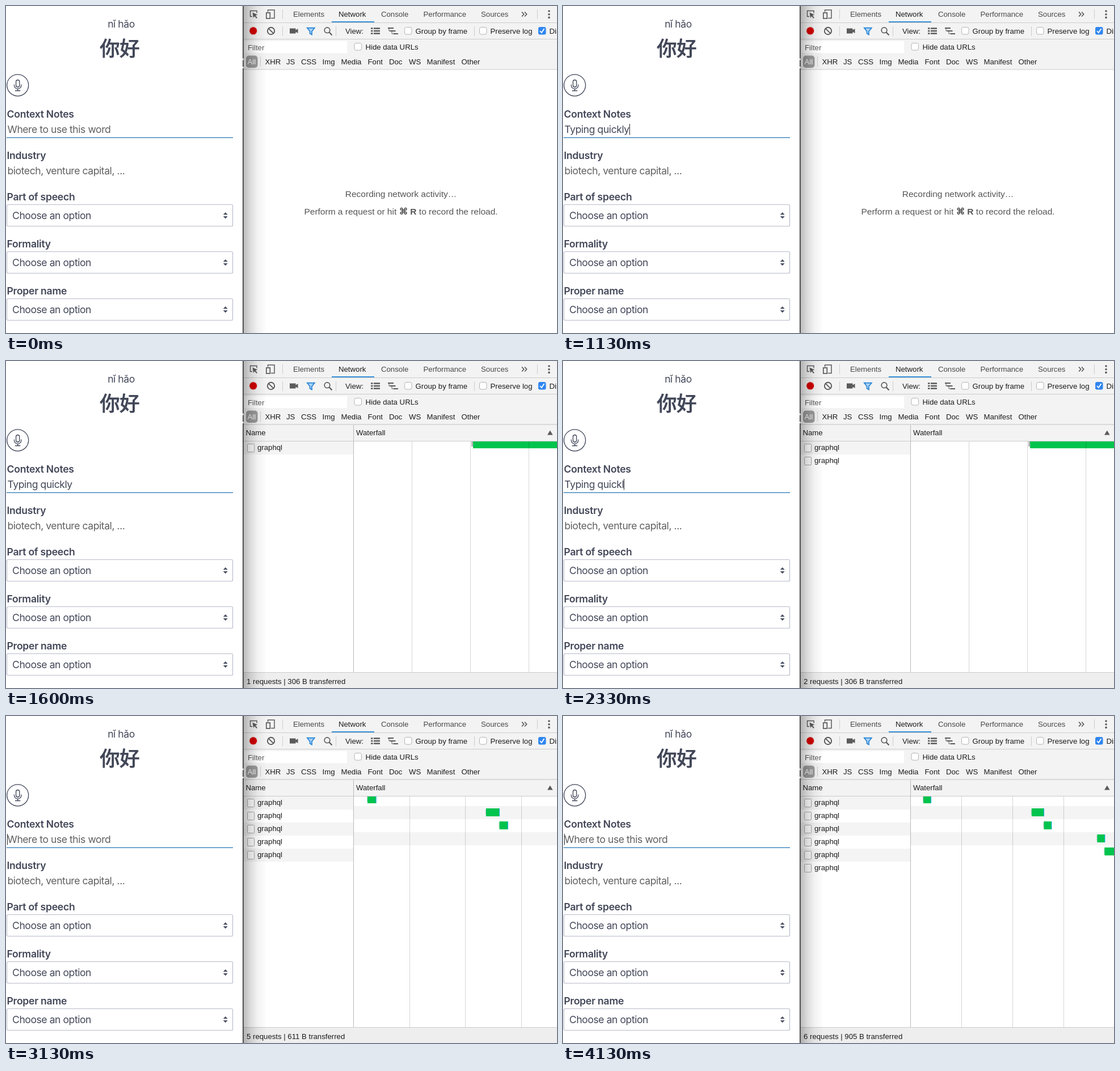
Recreate the animation shown at these times as an HTML page. Size 971x577 px, loop 4540 ms.

```html
<!DOCTYPE html>
<html lang="en">
<head>
<meta charset="utf-8">
<title>Throttled form requests</title>
<style>
  html, body { margin: 0; width: 100%; height: 100%; overflow: hidden; background: #fff; }
  svg { display: block; }
  text { white-space: pre; }
  .form { font: 17.6px Inter, "Open Sans", sans-serif; font-optical-sizing: none; letter-spacing: -.026em; fill: #424758; }
  .label { font-weight: 600; letter-spacing: -.015em; }
  .hint { fill: #606060; }
  .mid { text-anchor: middle; }
  .word { font: 35px "Noto Sans CJK SC", "Noto Sans CJK", sans-serif; letter-spacing: 0; stroke: #424758; stroke-width: 1.2; }
  .tools { font: 13.2px "Liberation Sans", Arial, sans-serif; fill: #1c1c1c; }
  .tabs { fill: #484848; }
  .big { font-size: 15.5px; fill: #555; }
  .line { fill: none; stroke: #ccc; }
  .icon { fill: none; stroke: #5a5a5a; stroke-width: 1.7; }
  .solid { fill: #5a5a5a; }
</style>
</head>
<body>
<svg width="971" height="577" viewBox="0 0 971 577">
  <defs>
    <linearGradient id="shade">
      <stop offset="0" stop-color="#000" stop-opacity=".27"/>
      <stop offset=".3" stop-color="#000" stop-opacity=".14"/>
      <stop offset=".6" stop-color="#000" stop-opacity=".05"/>
      <stop offset="1" stop-color="#000" stop-opacity="0"/>
    </linearGradient>
    <clipPath id="fall"><rect x="613" y="142" width="358" height="407"/></clipPath>
    <rect id="box" x=".5" y=".5" width="12.5" height="12.5" rx="3" fill="#fff" stroke="#b4b4b4"/>
    <g id="select">
      <rect x="1.5" y=".5" width="398" height="38" rx="2" fill="#fff" stroke="#b9bccb" stroke-width="1.2"/>
      <path d="M382.7 18.3l4-4.3 4 4.3zM382.7 21l4 4.3 4-4.3z" fill="#4a5064"/>
      <text x="11" y="26">Choose an option</text>
    </g>
  </defs>

  <g class="form">
    <text class="mid" x="203" y="38">nǐ hǎo</text>
    <text class="mid word" x="200.5" y="87.5" lang="zh-Hans">你好</text>
    <g fill="none" stroke="#3d4356" stroke-width="1.3">
      <circle cx="20.7" cy="139.8" r="19"/>
      <rect x="17.6" y="130.5" width="6.2" height="12.5" rx="3.1"/>
      <path d="M14.5 138.5v1.5a6.2 6.2 0 0 0 12.4 0v-1.5M20.7 146.2v3.3M16 149.5h9.4"/>
    </g>
    <g class="label">
      <text x="1.5" y="197">Context Notes</text>
      <text x="1.5" y="270">Industry</text>
      <text x="1.5" y="343">Part of speech</text>
      <text x="1.5" y="426">Formality</text>
      <text x="1.5" y="509">Proper name</text>
    </g>
    <text id="hint" class="hint" x="2.5" y="224">Where to use this word</text>
    <text id="typed" x="2.5" y="224"></text>
    <rect id="caret" y="208" width="1" height="19.5" fill="#222"/>
    <rect x="1" y="231.7" width="399" height="1.3" fill="#2f7ab9"/>
    <text class="hint" x="2.5" y="297">biotech, venture capital, ...</text>
    <use href="#select" y="350"/>
    <use href="#select" y="433"/>
    <use href="#select" y="516"/>
  </g>

  <g class="tools">
    <rect x="418" width="553" height="112" fill="#f3f3f3"/>
    <path class="line" d="M418 29.5H971M418 58.5H971M418 112H971M487.5 6v17M936.5 6v17M487.5 36v17M581.5 36v17M825.5 36v17M448.5 89v18"/>
    <rect x="574" y="27" width="75" height="2" fill="#3a92da"/>

    <g class="icon">
      <path d="M434 18.5h-3.5v-10h11.5v4" stroke-width="1.4"/>
      <path d="M461.5 10.5V7h11.5v14.5h-6" stroke-width="1.5"/>
      <rect x="458.8" y="12" width="6.5" height="10"/>
      <path d="M909 10.5l3.6 4-3.6 4M914 10.5l3.6 4-3.6 4"/>
      <circle cx="467" cy="44" r="6.2" stroke-width="1.9"/>
      <path d="M462.8 39.8l8.4 8.4" stroke-width="1.9"/>
      <circle cx="566" cy="42.7" r="4.8"/>
      <path d="M569.5 46.3l5 5.2" stroke-width="2.2"/>
      <path d="M643 39.5h3.5M643 44h3.5M643 48.5h3.5M648 39.5h11M648 44h11M648 48.5h11" stroke-width="2.4"/>
      <path d="M673 39h10M676.5 44h10M683 49h8" stroke-width="2.2"/>
      <path d="M675 40v4h2M680 45v4h3" stroke-width="1"/>
    </g>
    <g class="solid">
      <path d="M434.5 11.5l8.8 4-3.6 1.2 3.2 4-1.6 1.2-3.1-4-2.2 3z"/>
      <circle cx="957" cy="9" r="1.8"/><circle cx="957" cy="14.7" r="1.8"/><circle cx="957" cy="20.4" r="1.8"/>
      <path d="M500 39.5h10.5v3l4-2.5v8l-4-2.5v3H500z"/>
    </g>
    <circle cx="435.7" cy="43.8" r="7.6" fill="#efd6d6"/>
    <circle cx="435.7" cy="43.8" r="6.5" fill="#d40000"/>
    <path d="M530.8 38.7h13l-4.8 6v5.8l-3.5-2v-3.8z" fill="#a9d2f5" stroke="#2683d6" stroke-width="1.7"/>

    <g class="tabs">
      <text x="506" y="18.5">Elements</text>
      <text x="586" y="18.5" fill="#1c1c1c">Network</text>
      <text x="661" y="18.5">Console</text>
      <text x="735.5" y="18.5">Performance</text>
      <text x="837" y="18.5">Sources</text>
    </g>
    <text x="598" y="48.5">View:</text>
    <use href="#box" x="702" y="37"/>
    <text x="721.5" y="48.5">Group by frame</text>
    <use href="#box" x="834" y="37"/>
    <text x="853.5" y="48.5">Preserve log</text>
    <rect x="938" y="37" width="13.5" height="13.5" rx="3" fill="#2f86f0"/>
    <path d="M941 44l2.8 3 4.7-7" fill="none" stroke="#fff" stroke-width="1.8"/>
    <text x="957.5" y="48.5">Disable cache</text>

    <rect x="420" y="62" width="181" height="21" fill="#fff"/>
    <text x="426" y="77.5" fill="#5c5c5c">Filter</text>
    <use href="#box" x="613.5" y="65"/>
    <text x="633.5" y="76.5">Hide data URLs</text>

    <rect x="423" y="87.5" width="20.5" height="21.5" rx="5" fill="#9c9c9c"/>
    <text x="425.5" y="102.5" fill="#fff">All</text>
    <text x="456.5" y="102.5">XHR</text>
    <text x="494" y="102.5">JS</text>
    <text x="520" y="102.5">CSS</text>
    <text x="557.5" y="102.5">Img</text>
    <text x="590.5" y="102.5">Media</text>
    <text x="637.5" y="102.5">Font</text>
    <text x="675" y="102.5">Doc</text>
    <text x="710" y="102.5">WS</text>
    <text x="741.5" y="102.5">Manifest</text>
    <text x="802.5" y="102.5">Other</text>

    <g id="idle" class="mid big">
      <text x="696" y="336.5">Recording network activity…</text>
      <text x="696" y="367.5">Perform a request or hit <tspan font-weight="700">⌘ R</tspan> to record the reload.</text>
    </g>

    <g id="log">
      <rect x="418" y="112.5" width="553" height="29" fill="#f3f3f3"/>
      <g id="rows"></g>
      <g id="bars" clip-path="url(#fall)"></g>
      <rect x="418" y="550" width="553" height="27" fill="#eee"/>
      <path class="line" d="M418 112H971M418 141.5H971M418 549.5H971"/>
      <path d="M612.5 113V549" stroke="#b8b8b8"/>
      <text x="422.5" y="131">Name</text>
      <text x="617" y="131">Waterfall</text>
      <path d="M954 130.5l4.8-8 4.8 8z" fill="#5a5a5a"/>
      <text id="status" x="424" y="569.5"></text>
    </g>
  </g>
  <rect x="418" width="42" height="577" fill="url(#shade)"/>
  <rect x="417" width="1.7" height="577" fill="#3c3c3c"/>
  <path d="M417.8 92.5v3M417.8 107v3" stroke="#ddd" stroke-width="1.7"/>
</svg>

<script>
const LOOP = 4540, PHRASE = 'Typing quickly', LEFT = 613, RIGHT = 971, ROW = 23;
const $ = id => document.getElementById(id);

// [time, characters in the field]
const typing = [
  [0, 0], [270, 1], [330, 2], [400, 4], [470, 5], [530, 6], [670, 8], [730, 9],
  [800, 10], [870, 11], [930, 12], [1000, 13], [1130, 14],
  [2330, 13], [2470, 12], [2530, 11], [2600, 9], [2670, 8],
  [2730, 7], [2800, 5], [2870, 3], [2930, 1], [3000, 0]
];
// [time, caret visible]
const blink = [[0, 0], [270, 1], [1600, 0], [2130, 1], [2670, 0], [2730, 1], [3670, 0], [4130, 1]];
// [time, requests, bars shown, pixels per ms, bytes]
const network = [
  [0, 0, 0, 0, 0], [1270, 1, 0, .144, 0], [1400, 1, 1, 2.06, 306], [2000, 2, 1, 2.06, 306],
  [2530, 3, 2, .275, 306], [2600, 4, 3, .264, 611], [2730, 4, 3, .26, 611],
  [3070, 5, 4, .197, 611], [3200, 6, 5, .18, 905]
];
// [start, duration] in ms after the first request
const requests = [[0, 78], [1060, 122], [1180, 77], [1702, 77], [1774, 110]];

const at = (track, t) => track.findLast(step => step[0] <= t);
const rect = (x, y, w, h, fill) => `<rect x="${x}" y="${y}" width="${w}" height="${h}" fill="${fill}"/>`;

function drawRow(i) {
  const y = 142 + i * ROW;
  return (i % 2 ? '' : rect(418, y, 194, ROW, '#f4f4f4')) +
    `<rect x="425.5" y="${y + 4.5}" width="12" height="14" rx="1" fill="#fff" stroke="#a8a8a8"/>` +
    `<text x="443" y="${y + 15}">graphql</text>`;
}

function drawBar([start, span], i, scale) {
  const close = scale > 1;
  const x = LEFT + (start + (close ? 102 : 122)) * scale, w = span * scale, y = 140 + i * ROW;
  const lead = close ? 3 : 1;
  return (i % 2 ? rect(LEFT, y - 4, RIGHT - LEFT, ROW, '#f4f4f4') : '') +
    rect(x - lead, y + 2, lead, 9, close ? '#b5b5b5' : '#ccc') +
    rect(x, y, w, 14, '#00c44e') + rect(x + w - 1, y, 1, 14, '#12a5e8');
}

function drawGrid(scale) {
  const gap = scale * (scale > 1 ? 50 : 500);
  let out = '';
  for (let x = LEFT + gap; x < RIGHT; x += gap) out += rect(Math.floor(x - .5), 142, 1, 407, 'rgba(0,0,0,.16)');
  return out;
}

function drawNetwork([, count, shown, scale, bytes]) {
  $('idle').style.display = count ? 'none' : '';
  $('log').style.display = count ? '' : 'none';
  if (!count) return;
  $('rows').innerHTML = rect(418, 142, 553, 408, '#fff') +
    Array.from({ length: count }, (_, i) => drawRow(i)).join('');
  $('bars').innerHTML = requests.slice(0, shown).map((r, i) => drawBar(r, i, scale)).join('') + drawGrid(scale);
  $('status').textContent = `${count} requests | ${bytes} B transferred`;
}

function drawField(length, caret) {
  $('typed').textContent = PHRASE.slice(0, length);
  $('hint').style.display = length ? 'none' : '';
  $('caret').style.display = caret ? '' : 'none';
  $('caret').setAttribute('x', Math.round(2.4 + (length && $('typed').getComputedTextLength())));
}

let lastField, lastNet;
function frame() {
  const t = performance.now() % LOOP;
  const length = at(typing, t)[1], caret = at(blink, t)[1], net = at(network, t);
  const field = length + ':' + caret;
  if (field !== lastField) drawField(length, caret);
  if (net !== lastNet) drawNetwork(net);
  lastField = field;
  lastNet = net;
  requestAnimationFrame(frame);
}
frame();
</script>
</body>
</html>
```
